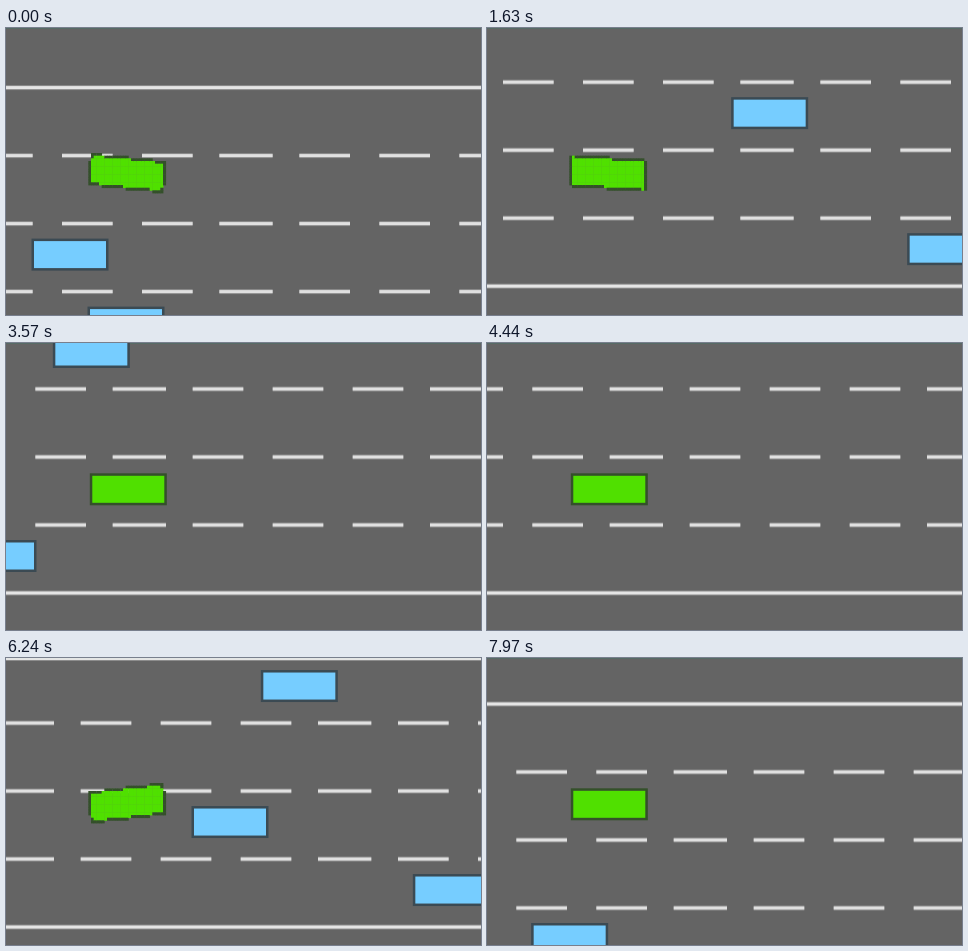
Recreate the animation shown at these times as an HTML page with a canvas. Size 475x287 px, loop 8 s.

```html
<!DOCTYPE html>
<html lang="en">
<head>
<meta charset="utf-8">
<title>Lane changes</title>
<style>
html, body { margin: 0; width: 100%; height: 100%; overflow: hidden; background: #646464; }
canvas { display: block; }
</style>
</head>
<body>
<canvas id="stage" width="475" height="287"></canvas>
<script>
const ctx = document.getElementById('stage').getContext('2d');
const W = 475, H = 287, LOOP = 8000, STEP = 66.72;
const CELL = 8 / 3;                       // coarse pixel of the simulated picture
const LANE = 68, ROW = 2.72;
const DASH_PERIOD = 29.75, DASH_LENGTH = 19.3;   // in cells

// Travelled distance in cells: [step, distance]
const travel = [[0, 0], [15, 160.05], [38, 397.05], [54, 575.55], [79, 850.1], [94, 1004.3], [120, 1289.25]];

// Lane changes of the green car: start step, direction (1 = down)
const changes = [[-11.2, 1], [10.5, 1], [89.25, -1]];

// Traffic: lane, a step, centre x at that step, pixels lost per step
const traffic = [
  [2, 0, 65, 13], [3, 0, 120, 13], [1, 15, 401, 13.17], [3, 38, 241, 15.5],
  [0, 38, 373, 17.9], [2, 79, 426, 13.47], [0, 94, 293, 15.5], [3, 94, 445, 13.9]
];

const snap = x => Math.round(x / CELL) * CELL;

function distanceAt(k) {
  let i = 1;
  while (i < travel.length - 1 && k > travel[i][0]) i++;
  const [k0, d0] = travel[i - 1], [k1, d1] = travel[i];
  return d0 + (d1 - d0) * (k - k0) / (k1 - k0);
}

// Damped step response of the steering, and its slope
const DECAY = 0.17, SWING = 0.13;
const shift = n => n <= 0 ? 0 :
  1 - Math.exp(-DECAY * n) * (Math.cos(SWING * n) + DECAY / SWING * Math.sin(SWING * n));
const slope = n => n <= 0 ? 0 :
  (DECAY ** 2 + SWING ** 2) / SWING * Math.exp(-DECAY * n) * Math.sin(SWING * n);

function box(x, y, w, h, color) {
  ctx.fillStyle = color;
  ctx.fillRect(x, y, w, h);
}

function softLine(x0, x1, y, strength) {
  box(x0, y - 2.5, x1 - x0, 5, 'rgba(245,245,245,.28)');
  box(x0, y - 1.5, x1 - x0, 3, `rgba(245,245,245,${strength})`);
}

function car(x, y, fill, edge) {
  box(x - 38.5, y - 16, 77, 32, edge);
  box(x - 36, y - 13.5, 72, 27, fill);
}

// A turned car is rasterised in coarse cells, which gives its stepped edges
function turnedCar(x, y, angle, fill, edge) {
  const c = Math.cos(angle), s = Math.sin(angle);
  for (let i = -16; i <= 16; i++) for (let j = -9; j <= 9; j++) {
    const along = Math.abs(i * c + j * s), across = Math.abs(j * c - i * s);
    if (along > 14.4 || across > 6) continue;
    const inside = along < 13.5 && across < 5.1;
    box(x + (i - 0.5) * CELL, y + (j - 0.5) * CELL, CELL + 0.4, CELL + 0.4, inside ? fill : edge);
  }
}

function draw(t) {
  const k = t < 30 ? 0 : 1 + Math.floor((t - 30) / STEP);
  let offset = 0, heading = 0;
  for (const [start, dir] of changes) {
    offset += dir * LANE * shift(k - start);
    heading += dir * 1.5 * slope(k - start - 2);
  }
  const top = Math.round((136 - offset - 0.48) / ROW) * ROW - 22;

  box(0, 0, W, H, '#646464');
  box(0, 0, W, 1, '#566b66');

  for (const y of [top, top + 4 * LANE]) {
    softLine(0, W, y > -4 ? Math.max(y, 0.5) : y, 0.85);
  }
  const first = 21.4 - distanceAt(k);
  const phase = (first % DASH_PERIOD + DASH_PERIOD) % DASH_PERIOD - DASH_PERIOD;
  for (let s = phase; s * CELL < W; s += DASH_PERIOD) {
    const x0 = Math.floor(s) * CELL, x1 = Math.floor(s + DASH_LENGTH) * CELL;
    for (let lane = 1; lane < 4; lane++) softLine(x0, x1, top + lane * LANE, 0.8);
  }

  for (const [lane, at, x, rate] of traffic) {
    car(snap(x - rate * (k - at)), top + LANE * (lane + 0.5) - 3, '#76cdff', '#3b4a53');
  }
  if (Math.abs(heading) > 0.035) turnedCar(121, 145, heading, '#50e000', '#34502a');
  else car(122.3, 146.3, '#50e000', '#34502a');
}

function frame() {
  draw(performance.now() % LOOP);
  requestAnimationFrame(frame);
}
frame();
</script>
</body>
</html>
```
